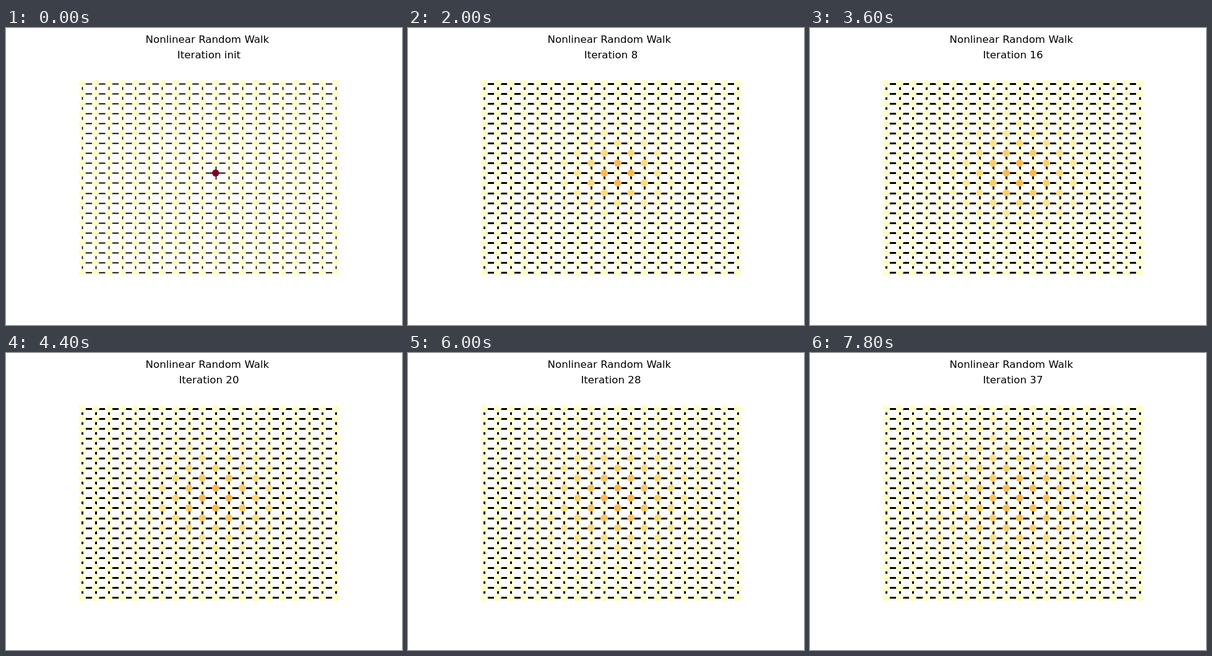
These frames come from a looping animation (640x480 px, 8000 ms). An HTML page with a canvas:

```html
<!DOCTYPE html>
<html lang="en">
<head>
<meta charset="utf-8">
<title>Nonlinear Random Walk</title>
<style>
  html, body { margin: 0; width: 100%; height: 100%; overflow: hidden; background: #fff; }
  canvas, svg { position: absolute; left: 0; top: 0; }
  text { font: 16.67px "DejaVu Sans", sans-serif; text-anchor: middle; }
</style>
</head>
<body>
<canvas id="stage" width="640" height="480"></canvas>
<svg width="640" height="480">
  <text x="325.4" y="24">Nonlinear Random Walk</text>
  <text id="label" x="328" y="49"></text>
</svg>
<script>
const SIZE = 20, FRAMES = 40, FRAME_MS = 200;
const START = 9 * SIZE + 10;
const PEAK = 0.355; // colour level of the most likely node once the walk has begun
const RADIUS = 5.6;
const RAMP = [
  [255, 255, 204], [255, 237, 160], [254, 217, 118], [254, 178, 76], [253, 141, 60],
  [252, 78, 42], [227, 26, 28], [189, 0, 38], [128, 0, 38]
];
const ctx = document.getElementById('stage').getContext('2d');
const label = document.getElementById('label');

const nodeX = col => 123.04 + col * 409.92 / (SIZE - 1);
const nodeY = row => 89.67 + row * 305.46 / (SIZE - 1);
const snap = v => Math.floor(v + 0.5) + 0.5;

function rampColor(level) {
  const pos = level * (RAMP.length - 1);
  const i = Math.min(Math.floor(pos), RAMP.length - 2);
  const mix = RAMP[i].map((c, j) => Math.round(c + (RAMP[i + 1][j] - c) * (pos - i)));
  return `rgb(${mix})`;
}

function neighbours(i) {
  const col = i % SIZE, row = Math.floor(i / SIZE), list = [];
  if (col > 0) list.push(i - 1);
  if (col < SIZE - 1) list.push(i + 1);
  if (row > 0) list.push(i - SIZE);
  if (row < SIZE - 1) list.push(i + SIZE);
  return list;
}

// Every node hands its probability to its neighbours in equal shares.
function walk(prob) {
  const next = new Array(prob.length).fill(0);
  prob.forEach((p, i) => {
    const targets = neighbours(i);
    for (const t of targets) next[t] += p / targets.length;
  });
  return next;
}

const initial = new Array(SIZE * SIZE).fill(0);
initial[START] = 1;
const states = [initial];
while (states.length < FRAMES - 1) states.push(walk(states[states.length - 1]));

const palettes = states.map((prob, step) => {
  const scale = (step ? PEAK : 1) / Math.max(...prob);
  return prob.map(p => rampColor(p * scale));
});

function drawEdges() {
  ctx.beginPath();
  for (let i = 0; i < SIZE; i++) {
    const x = snap(nodeX(i)), y = snap(nodeY(i));
    ctx.moveTo(x, nodeY(0));
    ctx.lineTo(x, nodeY(SIZE - 1));
    ctx.moveTo(nodeX(0), y);
    ctx.lineTo(nodeX(SIZE - 1), y);
  }
  ctx.stroke();
}

function drawNodes(colors) {
  colors.forEach((color, i) => {
    ctx.fillStyle = color;
    ctx.beginPath();
    ctx.arc(nodeX(i % SIZE), nodeY(Math.floor(i / SIZE)), RADIUS, 0, 2 * Math.PI);
    ctx.fill();
  });
}

// Passes pile up over time, so soft outlines grow firmer as the walk goes on.
function drawFrame(frame) {
  ctx.fillStyle = '#fff';
  ctx.fillRect(0, 0, 640, 480);
  ctx.strokeStyle = '#000';
  ctx.lineWidth = 1.39;
  for (let pass = -1; pass <= frame; pass++) drawEdges();
  for (let pass = -1; pass <= frame; pass++) drawNodes(palettes[Math.max(0, pass - 1)]);
  label.textContent = 'Iteration ' + (frame < 2 ? 'init' : frame - 2);
}

let shown = -1;
function tick() {
  const frame = Math.floor(performance.now() / FRAME_MS) % FRAMES;
  if (frame !== shown) drawFrame(shown = frame);
  requestAnimationFrame(tick);
}
tick();
</script>
</body>
</html>
```
